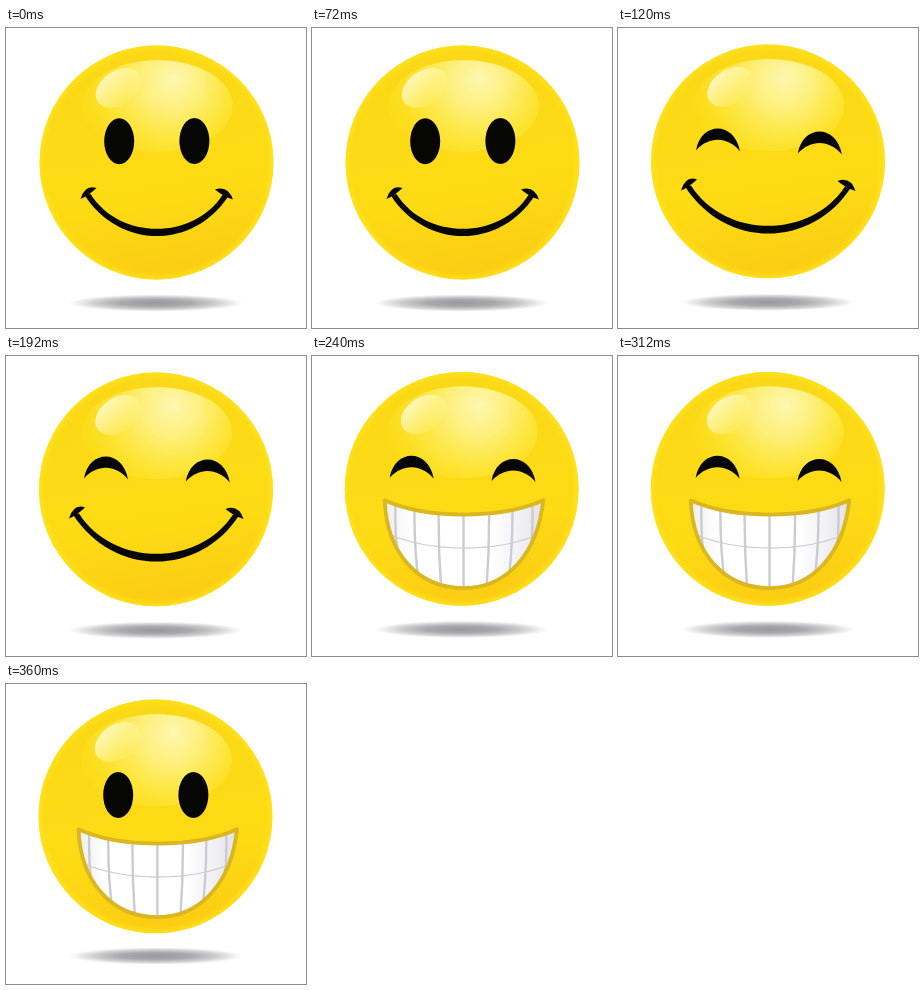
An HTML page with a canvas that plays this animation: 300x300 px, repeating every 480 ms.

```html
<!DOCTYPE html>
<html lang="en">
<head>
<meta charset="utf-8">
<title>Smiley</title>
<style>
html, body { margin: 0; width: 100%; height: 100%; overflow: hidden; background: #fff; }
canvas { display: block; width: 300px; height: 300px; }
</style>
</head>
<body>
<canvas id="stage" width="300" height="300"></canvas>
<script>
const ctx = document.getElementById('stage').getContext('2d');
const STEP = 120;
const RADIUS = 116.9;
const INK = '#060604';
const GOLD = '#d9b622';

const poses = [
  { x: 150.5, y: 134.5, shadow: 275, eyes: openEyes, mouth: smile, drop: 0 },
  { x: 150, y: 133.4, shadow: 274.3, eyes: closedEyes, mouth: wideSmile, drop: 0 },
  { x: 149.7, y: 132.8, shadow: 273.4, eyes: closedEyes, mouth: grin, drop: 0 },
  { x: 149.5, y: 132.4, shadow: 272, eyes: openEyes, mouth: grin, drop: 1.4 }
];

function fillWith(gradient, stops) {
  stops.forEach(([at, color]) => gradient.addColorStop(at, color));
  ctx.fillStyle = gradient;
}

function oval(x, y, rx, ry, turn = 0) {
  ctx.beginPath();
  ctx.ellipse(x, y, rx, ry, turn, 0, Math.PI * 2);
  ctx.fill();
}

function shadow(y) {
  ctx.save();
  ctx.translate(149.8, y);
  ctx.scale(1, 0.1);
  fillWith(ctx.createRadialGradient(0, 0, 0, 0, 0, 87), [
    [0, '#98999b'], [0.4, '#a8a9ac'], [0.7, '#cdced0'], [0.9, '#f0f0f1'], [1, '#fff']
  ]);
  oval(0, 0, 87, 87);
  ctx.restore();
}

// The face is drawn around its own centre.
function ball() {
  fillWith(ctx.createLinearGradient(-20, -RADIUS, 20, RADIUS), [
    [0, '#fad817'], [0.4, '#fcda15'], [0.65, '#fddb14'], [1, '#fbcb13']
  ]);
  oval(0, 0, RADIUS, RADIUS);
  fillWith(ctx.createRadialGradient(0, 0, RADIUS - 7, 0, 0, RADIUS), [
    [0, 'rgba(255,226,26,0)'], [1, 'rgba(255,226,26,.9)']
  ]);
  oval(0, 0, RADIUS, RADIUS);

  fillWith(ctx.createRadialGradient(18, -84, 0, 12, -78, 86), [
    [0, 'rgba(255,252,205,.85)'], [0.35, 'rgba(255,250,170,.68)'],
    [0.7, 'rgba(255,240,90,.5)'], [1, 'rgba(255,228,40,.2)']
  ]);
  oval(1, -56.5, 75.3, 46);

  fillWith(ctx.createLinearGradient(-58, -88, -24, -62), [
    [0, 'rgba(255,255,245,.85)'], [0.5, 'rgba(255,253,205,.5)'], [1, 'rgba(255,248,150,.1)']
  ]);
  oval(-38, -74.5, 25, 17, -0.6);
}

function openEyes() {
  ctx.fillStyle = INK;
  oval(-37.3, -21.3, 15, 23);
  oval(37.9, -21.5, 15, 23);
}

function closedEye(x, y) {
  ctx.beginPath();
  ctx.moveTo(x - 22, y);
  ctx.bezierCurveTo(x - 17, y - 29.5, x + 17, y - 29.5, x + 22, y + 1);
  ctx.bezierCurveTo(x + 10, y - 14, x - 9, y - 14.5, x - 22, y);
  ctx.fill();
}

function closedEyes() {
  ctx.fillStyle = INK;
  closedEye(-50, -11);
  closedEye(51.8, -7.8);
}

function cap(x0, y0, cx, cy, x1, y1, ix, iy) {
  ctx.beginPath();
  ctx.moveTo(x0, y0);
  ctx.quadraticCurveTo(cx, cy, x1, y1);
  ctx.quadraticCurveTo(ix, iy, x0, y0);
  ctx.fill();
}

// Crescent with a small tapered cheek mark at each end.
function crescent(half, top, low, thick) {
  ctx.fillStyle = INK;
  const inner = top + (low - thick - top) * 4 / 3;
  const outer = top + (low - top) * 4 / 3;
  const bend = half * 0.53;
  ctx.beginPath();
  ctx.moveTo(-half - 2.5, top + 1);
  ctx.bezierCurveTo(-bend, outer, bend, outer, half + 2.5, top + 2);
  ctx.lineTo(half - 3.5, top + 1);
  ctx.bezierCurveTo(bend, inner, -bend, inner, -half + 3.5, top);
  ctx.closePath();
  ctx.fill();
  cap(-half - 6.5, top + 5, -half - 2, top - 10, -half + 9.5, top - 6, -half + 1, top + 2);
  cap(half + 7, top + 5.5, half + 2, top - 9, half - 11, top - 4.5, half - 2, top + 3);
}

function smile() {
  crescent(69.5, 31.5, 73.2, 7);
}

function wideSmile() {
  crescent(80.5, 24, 71.7, 7.5);
}

function mouthPath() {
  ctx.beginPath();
  ctx.moveTo(-77, 11.5);
  ctx.bezierCurveTo(-36, 30.5, 40, 30.5, 81.5, 11.5);
  ctx.bezierCurveTo(76, 65, 45, 99.3, 2, 99.3);
  ctx.bezierCurveTo(-44, 99.3, -75, 64, -77, 11.5);
  ctx.closePath();
}

function grin() {
  ctx.save();
  mouthPath();
  fillWith(ctx.createLinearGradient(-76, 0, 80, 0), [
    [0, '#eeeef2'], [0.16, '#fff'], [0.68, '#fff'], [0.85, '#f2f2f6'], [1, '#e2e2e9']
  ]);
  ctx.fill();
  ctx.clip();

  ctx.strokeStyle = '#cbcbd1';
  ctx.lineWidth = 2.4;
  for (const x of [-66, -47, -23, 1.8, 27.3, 50.5, 70.5]) {
    ctx.beginPath();
    ctx.moveTo(x, 10);
    ctx.quadraticCurveTo(x + (x - 2) * 0.03, 55, x - (x - 2) * 0.1, 101);
    ctx.stroke();
  }
  ctx.lineWidth = 1.2;
  ctx.beginPath();
  ctx.moveTo(-74, 45);
  ctx.bezierCurveTo(-30, 64, 36, 64, 78, 45);
  ctx.stroke();
  ctx.restore();

  mouthPath();
  ctx.strokeStyle = GOLD;
  ctx.lineWidth = 3.8;
  ctx.lineJoin = 'round';
  ctx.stroke();
}

function draw(time) {
  const pose = poses[Math.floor(time / STEP) % poses.length];
  ctx.fillStyle = '#fff';
  ctx.fillRect(0, 0, 300, 300);
  shadow(pose.shadow);
  ctx.save();
  ctx.translate(pose.x, pose.y);
  ball();
  pose.eyes();
  ctx.translate(0, pose.drop);
  pose.mouth();
  ctx.restore();
}

const start = performance.now();
function tick() {
  draw(performance.now() - start);
  requestAnimationFrame(tick);
}
tick();
</script>
</body>
</html>
```
